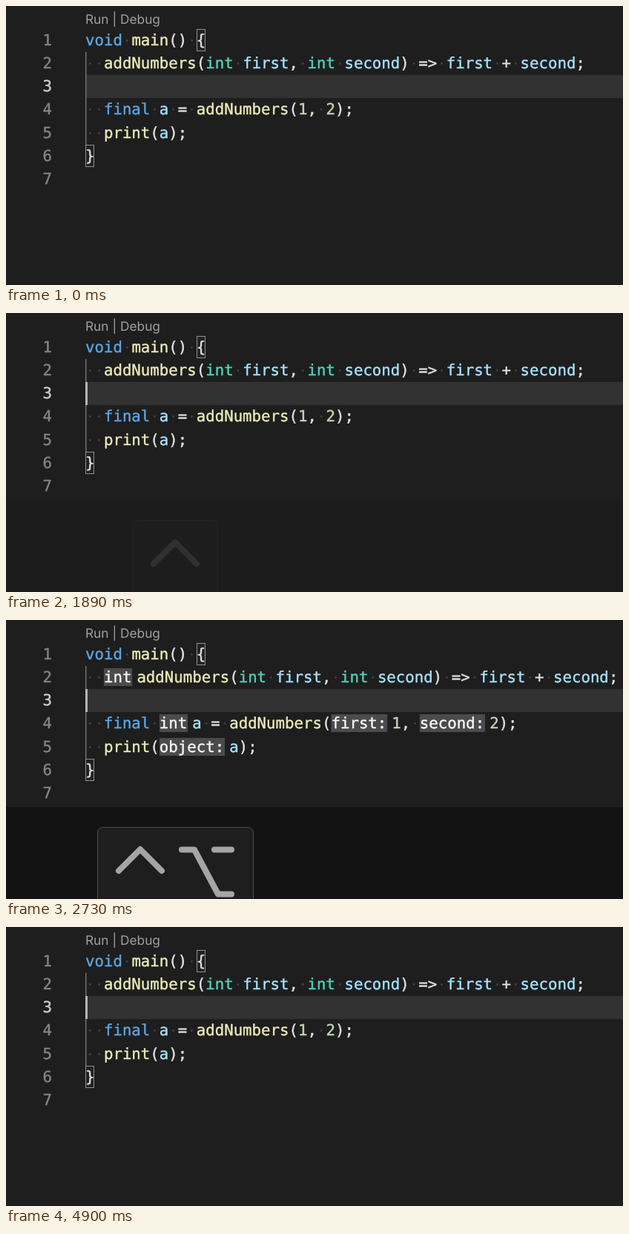
Recreate the animation shown at these times as an HTML page. Size 832 px wide and 376 px high, loop 4.97 s.

```html
<!DOCTYPE html>
<html lang="en">
<head>
<meta charset="utf-8">
<title>Inlay hints</title>
<style>
  html, body { margin: 0; width: 100%; height: 100%; overflow: hidden; background: #1e1e1e; }
  svg { display: block; width: 832px; height: 376px; }
  text { font: 20.73px "DejaVu Sans Mono", monospace; text-rendering: geometricPrecision; white-space: pre; stroke-width: .4; }
  .lens { font: 17.3px Inter, sans-serif; fill: #a0a0a0; }
  .bracket { fill: #212321; stroke: #909090; }
  .key { fill: #1f1f1f; stroke: #6a6a6a; }
  .glyph { fill: none; stroke: #f0f0f0; stroke-width: 8; stroke-linecap: round; stroke-linejoin: round; }
</style>
</head>
<body>
<svg id="stage" viewBox="0 0 832 376"></svg>
<script>
const LOOP = 4970;
const LEFT = 107, CHAR = 12.48, BASE = 53.15, ROW = 31.1, HINT_GAP = 7;

// Square brackets mark the inlay hints.
const CODE = [
  'void main() {',
  '  [int]addNumbers(int first, int second) => first + second;',
  '',
  '  final [int]a = addNumbers([first:]1, [second:]2);',
  '  print([object:]a);',
  '}',
  ''
];

const COLORS = {
  keyword: '#5ca7e4', type: '#50d3ba', call: '#ebebb8',
  name: '#a5e2ff', number: '#c0d8b2', sign: '#e2e2e2'
};
const TOKEN = /(?<hint>\[.+?\])|(?<space> )|(?<keyword>void|final)|(?<type>int)\b|(?<call>\w+(?=\())|(?<number>\d+)|(?<name>\w+)|(?<sign>[^\w\s\[]+)/g;

function add(parent, tag, attrs, content = '') {
  const el = document.createElementNS('http://www.w3.org/2000/svg', tag);
  for (const key in attrs) el.setAttribute(key, attrs[key]);
  el.textContent = content;
  return parent.appendChild(el);
}

const baseline = row => Math.round(BASE + row * ROW);

function write(parent, x, row, color, content) {
  add(parent, 'text', { x, y: baseline(row), fill: color, stroke: color }, content);
}

function drawLine(parent, line, row) {
  const y = baseline(row);
  let x = LEFT;
  for (const { 0: raw, groups } of line.matchAll(TOKEN)) {
    const kind = Object.keys(groups).find(k => groups[k] !== undefined);
    const word = kind === 'hint' ? raw.slice(1, -1) : raw;
    const width = word.length * CHAR;
    if (kind === 'space') {
      add(parent, 'circle', { cx: x + CHAR / 2, cy: y - 6.5, r: 1.4, fill: '#444' });
    } else if (kind === 'hint') {
      add(parent, 'rect', { x, y: y - 19, width: width + .8, height: 24, fill: '#4b4b4b' });
      write(parent, x, row, '#f8f8f8', word);
      x += HINT_GAP;
    } else {
      write(parent, x, row, COLORS[kind], word);
    }
    x += width;
  }
}

// Each step [time, value] holds until the next one.
function play(el, steps) {
  const frames = steps.map(([time, opacity]) => ({ opacity, offset: time / LOOP, easing: 'step-end' }));
  frames.push({ opacity: steps.at(-1)[1], offset: 1 });
  el.animate(frames, { duration: LOOP, iterations: Infinity });
}

const stage = document.getElementById('stage');
add(stage, 'rect', { width: 832, height: 376, fill: '#1e1e1e' });
add(stage, 'rect', { x: LEFT, y: 93, width: 725, height: 31, fill: '#323232' });
add(stage, 'rect', { x: LEFT, y: 62, width: 1.5, height: 125, fill: '#707070' });
add(stage, 'text', { x: LEFT, y: 24, class: 'lens' }, 'Run | Debug');
add(stage, 'rect', { x: 257.5, y: 31.5, width: 11, height: 29, class: 'bracket' });
add(stage, 'rect', { x: 107.5, y: 187.5, width: 11, height: 29, class: 'bracket' });

const plain = add(stage, 'g');
const hinted = add(stage, 'g');
CODE.forEach((line, row) => {
  write(stage, 49.5, row, row === 2 ? '#d0d0d0' : '#858585', row + 1);
  drawLine(plain, line.replace(/\[.+?\]/g, ''), row);
  drawLine(hinted, line, row);
});

const cursor = add(stage, 'rect', { x: LEFT, y: 93, width: 3, height: 31, fill: '#b4b4b4' });

const overlay = add(stage, 'g');
add(overlay, 'rect', { y: 252, width: 832, height: 124, fill: '#0f0f0f' });

function drawKeys(x, width, paths) {
  const group = add(overlay, 'g');
  add(group, 'rect', { x, y: 279.5, width, height: 120, rx: 7, class: 'key' });
  paths.forEach(d => add(group, 'path', { d, class: 'glyph' }));
  return group;
}
const chevron = x => `M${x - 29} 338L${x} 309L${x + 29} 338`;
const oneKey = drawKeys(171.5, 114, [chevron(228)]);
const twoKeys = drawKeys(123.5, 210, [chevron(181), 'M237 309.5H254L286 369.5H304', 'M281 309.5H304']);

play(cursor, [[0, 0], [420, 1], [910, 0], [1470, 1], [1960, 0], [2520, 1], [3010, 0], [3500, 1], [4060, 0], [4620, 1]]);
play(plain, [[0, 1], [2100, 0], [3920, 1]]);
play(hinted, [[0, 0], [2100, 1], [3920, 0]]);
play(oneKey, [[0, 1], [2100, 0]]);
play(twoKeys, [[0, 0], [2100, 1]]);
play(overlay, [[0, 0], [1820, .01], [1890, .09], [1960, .35], [2030, .65], [2100, .9], [2170, 1], [2730, .65], [2800, .25], [2870, 0]]);
</script>
</body>
</html>
```
